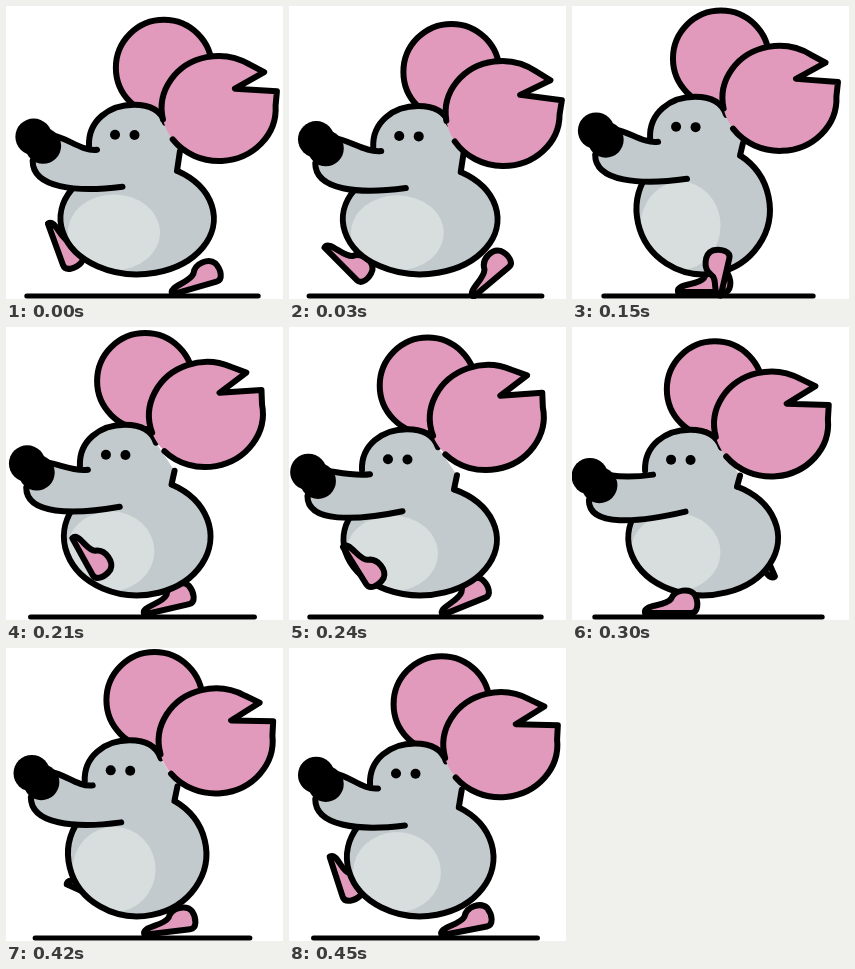
An HTML page with a canvas that plays this animation: 277x293 px, repeating every 480 ms.

```html
<!DOCTYPE html>
<html lang="en">
<head>
<meta charset="utf-8">
<title>Running mouse</title>
<style>
  html, body { margin: 0; width: 100%; height: 100%; overflow: hidden; background: #fff; }
  canvas { display: block; width: 277px; height: 293px; }
</style>
</head>
<body>
<canvas id="stage"></canvas>
<script>
const W = 277, H = 293, STEPS = 16, STEP_MS = 30, TAU = Math.PI * 2;
const PINK = '#e19abc', GRAY = '#c2cacd', LIGHT = '#d8dedd', INK = '#000';

const canvas = document.getElementById('stage');
const ctx = canvas.getContext('2d');
const dpr = window.devicePixelRatio || 1;
canvas.width = Math.round(W * dpr);
canvas.height = Math.round(H * dpr);

const rad = deg => deg * Math.PI / 180;

// Smooth periodic motion: least-squares fit of two harmonics through a few poses.
const POSE_STEPS = [0, 3, 5, 7, 10, 12, 15];
const basis = i => {
  const a = TAU * i / STEPS;
  return [1, Math.cos(a), Math.sin(a), Math.cos(2 * a), Math.sin(2 * a)];
};

function solve(m) {
  const n = m.length;
  for (let c = 0; c < n; c++) {
    let p = c;
    for (let r = c + 1; r < n; r++) if (Math.abs(m[r][c]) > Math.abs(m[p][c])) p = r;
    [m[c], m[p]] = [m[p], m[c]];
    for (let r = 0; r < n; r++) {
      if (r === c) continue;
      const k = m[r][c] / m[c][c];
      for (let j = c; j <= n; j++) m[r][j] -= k * m[c][j];
    }
  }
  return m.map((row, i) => row[n] / row[i]);
}

function harmonic(...values) {
  const rows = POSE_STEPS.map(basis);
  const normal = rows[0].map((_, a) => [
    ...rows[0].map((_, b) => rows.reduce((s, r) => s + r[a] * r[b], 0)),
    rows.reduce((s, r, i) => s + r[a] * values[i], 0)
  ]);
  const k = solve(normal);
  return i => basis(i).reduce((s, b, j) => s + b * k[j], 0);
}

const motion = {
  eyeX: harmonic(109, 109, 104, 100, 99, 101, 107),
  eyeY: harmonic(130, 124, 122, 127, 133, 124, 124.5),
  noseX: harmonic(33, 30.5, 29.5, 26, 23, 26, 32),
  noseY: harmonic(135.5, 132.5, 129.5, 140, 153.5, 138.5, 130.5),
  earX: harmonic(213, 213, 207.5, 200, 199, 205, 211),
  earY: harmonic(103, 106, 92, 88, 96.5, 95, 96),
  earTurn: harmonic(0, 9.5, 0.7, -6, -1.5, 1.5, -1),
  backX: harmonic(157.5, 162, 149, 139, 143, 145, 153),
  backY: harmonic(63, 62, 53, 54, 62, 55, 55)
};

// Foot keys: step, ankle x, ankle y, turn in degrees, length
const nearFoot = [
  [0, 201, 268, -16, 1], [1, 208, 258, -40, 1], [3, 196, 219, -114, 1.05],
  [5, 146, 257, -77, 0.8], [7, 92, 237, 61, 0.9], [8, 82, 246, 58, 0.95],
  [10, 112, 276, 0, 1], [12, 148, 276, 0, 1], [15, 189, 270, -11, 1]
];
const farFoot = [
  [0, 64, 249, 70, 0.95], [1, 70, 262, 45, 1], [3, 107, 276, 0, 1],
  [5, 145, 276, 0, 1], [7, 174, 269, -13, 1], [8, 186, 264, -22, 1],
  [10, 178, 218, -114, 1], [12, 168, 244, -80, 0.8], [15, 61, 239, 72, 0.9]
];

// Periodic cubic spline through keys
function spline(keys, i) {
  const n = keys.length;
  const key = k => {
    const turn = Math.floor(k / n);
    const [step, ...rest] = keys[k - turn * n];
    return [step + turn * STEPS, ...rest];
  };
  let k = n - 1;
  while (keys[k][0] > i) k--;
  const [p, a, b, q] = [key(k - 1), key(k), key(k + 1), key(k + 2)];
  const span = b[0] - a[0], t = (i - a[0]) / span;
  return [1, 2, 3, 4].map(c => {
    const ma = (b[c] - p[c]) / (b[0] - p[0]) * span;
    const mb = (q[c] - a[c]) / (q[0] - a[0]) * span;
    const d = b[c] - a[c];
    return a[c] + t * (ma + t * (3 * d - 2 * ma - mb + t * (ma + mb - 2 * d)));
  });
}

function shape(fill, build, stroke = true) {
  ctx.beginPath();
  build();
  if (fill) {
    ctx.fillStyle = fill;
    ctx.fill();
  }
  if (stroke) ctx.stroke();
}

const oval = (x, y, rx, ry = rx) => ctx.ellipse(x, y, rx, ry, 0, 0, TAU);

function drawFoot(keys, i) {
  const [x, y, turn, length] = spline(keys, i);
  ctx.save();
  ctx.translate(x, y);
  ctx.rotate(rad(turn));
  shape(PINK, () => {
    const toe = -39 * length;
    ctx.moveTo(toe, 10);
    ctx.bezierCurveTo(toe - 2, 1, toe / 2, 4, -13, -4);
    ctx.bezierCurveTo(-9, -14, 6, -15, 11, -8);
    ctx.bezierCurveTo(15, 0, 14, 10, 7, 10);
    ctx.closePath();
  });
  ctx.restore();
}

function drawFrontEar(x, y, turn) {
  const rx = 57, ry = 52.5;
  const notch = () => {
    ctx.lineTo(45, -37);
    ctx.lineTo(16, -20);
    ctx.lineTo(58, -18);
  };
  const arc = (from, to) => ctx.ellipse(0, 0, rx, ry, 0, rad(from), rad(to));
  ctx.save();
  ctx.translate(x, y);
  ctx.rotate(rad(turn));
  shape(PINK, () => { arc(-4, 302); notch(); ctx.closePath(); }, false);
  shape(null, () => { arc(167, 302); notch(); arc(-4, 143); });
  ctx.restore();
}

function drawBody(body, cornerX) {
  const { x, y, rx, ry, sway } = body;
  const start = -Math.acos((cornerX - x) / rx);
  shape(GRAY, () => oval(x, y, rx, ry), false);
  ctx.save();
  ctx.beginPath();
  oval(x, y, rx, ry);
  ctx.clip();
  shape(LIGHT, () => oval(x - 2 - 0.31 * rx + sway * 0.5, y + 0.25 * ry, 0.6 * rx, 0.68 * ry), false);
  ctx.restore();
  shape(null, () => ctx.ellipse(x, y, rx, ry, 0, start, rad(212)));
  return y + ry * Math.sin(start);
}

function drawHead(ex, ey, nx, ny, cornerX, cornerY) {
  const mouthX = 115 + (ex - 104) * 0.3, mouthY = ey + 52;
  const chinX = nx - 6, chinY = ny + 20;
  const sag = mouthY + 6 + (ny - mouthY + 46) * 0.35;
  const snout = () => {
    ctx.lineTo(nx + 15, ny - 5);
    ctx.bezierCurveTo(nx + 28, ny - 3, ex - 32, ey + 17, ex - 18, ey + 15);
  };
  const skull = () => {
    ctx.lineTo(ex - 26, ey + 11);
    ctx.bezierCurveTo(ex - 27, ey - 14, ex - 6, ey - 30, ex + 19, ey - 30);
    ctx.bezierCurveTo(ex + 35, ey - 30, ex + 46, ey - 24, ex + 50, ey - 12);
  };
  const mouth = () => {
    ctx.lineTo(mouthX, mouthY);
    ctx.bezierCurveTo(mouthX - 47, sag, chinX, chinY + 27, chinX, chinY);
  };
  const neck = () => {
    ctx.lineTo(cornerX + 3, ey + 16);
    ctx.lineTo(cornerX, cornerY);
  };
  shape(GRAY, () => { snout(); skull(); neck(); mouth(); }, false);
  [snout, skull, mouth, neck].forEach(part => shape(null, part));
  shape(INK, () => oval(nx - 5, ny - 4, 18.3), false);
  shape(INK, () => oval(nx + 4.5, ny + 5, 18), false);
  shape(INK, () => oval(ex, ey, 5), false);
  shape(INK, () => oval(ex + 19.5, ey + 0.3, 5), false);
}

function draw(i) {
  const m = {};
  for (const name in motion) m[name] = motion[name](i);

  const rx = 72 + 5.5 * Math.cos(TAU * (i - 0.7) / 8);
  const ry = 56 + (76.5 - rx) * 0.9;
  const sway = m.eyeX - 104;
  const body = { x: 131.2, y: 268.3 - ry, rx, ry, sway };
  const cornerX = 168 + sway * 0.6;
  const ground = 104.5 + (rx - 66.5) * 1.1;

  ctx.setTransform(dpr, 0, 0, dpr, 0, 0);
  ctx.fillStyle = '#fff';
  ctx.fillRect(0, 0, W, H);
  ctx.strokeStyle = INK;
  ctx.lineCap = ctx.lineJoin = 'round';

  ctx.lineWidth = 5;
  shape(null, () => {
    ctx.moveTo(136.5 - ground, 290);
    ctx.lineTo(136.5 + ground, 290);
  });

  ctx.lineWidth = 6;
  drawFoot(farFoot, i);
  shape(PINK, () => oval(m.backX, m.backY, 48));
  const cornerY = drawBody(body, cornerX);
  drawHead(m.eyeX, m.eyeY, m.noseX, m.noseY, cornerX, cornerY);
  drawFrontEar(m.earX, m.earY, m.earTurn);
  drawFoot(nearFoot, i);
}

const begin = performance.now();
function tick() {
  draw(Math.floor((performance.now() - begin) / STEP_MS) % STEPS);
  requestAnimationFrame(tick);
}
tick();
</script>
</body>
</html>
```
